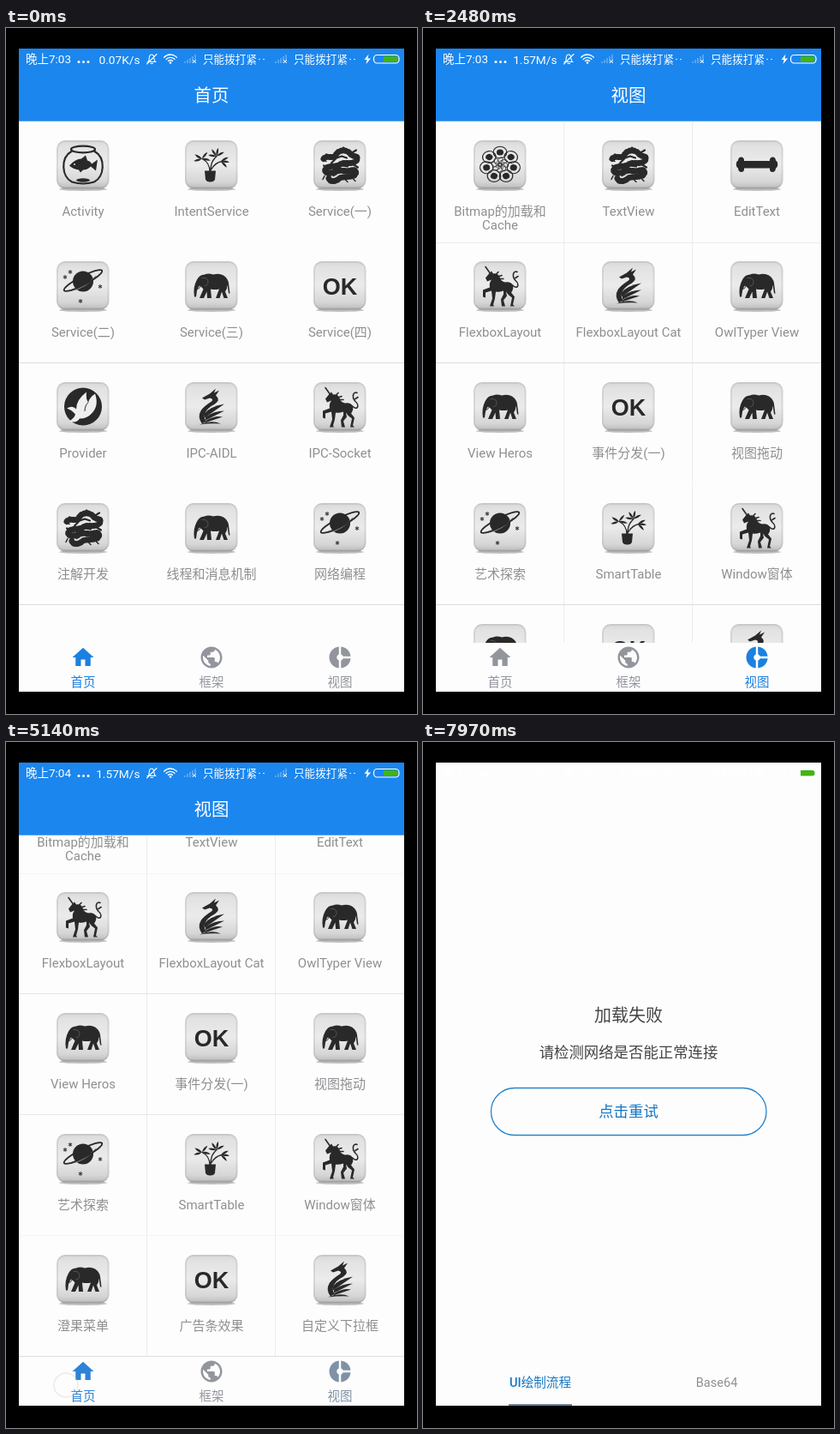
Recreate the animation shown at these times as an HTML page with a canvas. Size 480 by 800 pixels, loop 8000 ms.

```html
<!DOCTYPE html>
<html lang="zh">
<head>
<meta charset="utf-8">
<title>App tabs</title>
<style>
html, body { margin: 0; width: 100%; height: 100%; overflow: hidden; background: #000; }
canvas { display: block; width: 100%; height: 100%; }
</style>
</head>
<body>
<canvas id="stage" width="480" height="800"></canvas>
<script>
const ctx = document.getElementById('stage').getContext('2d');
const LOOP = 8000;
const FONT = 'Roboto, "Noto Sans CJK SC", "Noto Sans CJK", sans-serif';
const PAPER = '#fdfdfd', BLUE = '#1b86ee', INK = '#292929', LABEL = '#8f8f93';
const TOP = 109, BOTTOM = 717, ROW = 141, MAX_SCROLL = 97;
const COLS = [90, 240, 390];

const clamp = (v, a = 0, b = 1) => Math.min(b, Math.max(a, v));
const ramp = (t, a, b) => clamp((t - a) / (b - a));
const lerp = (a, b, p) => a + (b - a) * p;
const easeOut = p => 1 - (1 - p) ** 3;

function mix(a, b, p) {
  return `rgb(${a.map((v, i) => Math.round(lerp(v, b[i], p))).join()})`;
}

function text(s, x, y, size, color, align = 'center', weight = 400) {
  ctx.font = `${weight} ${size}px ${FONT}`;
  ctx.textAlign = align;
  ctx.fillStyle = color;
  ctx.fillText(s, x, y + size * 0.365);
}

function rect(x, y, w, h, color) {
  ctx.fillStyle = color;
  ctx.fillRect(x, y, w, h);
}

function at(x, y, draw, scale = 1) {
  ctx.save();
  ctx.translate(x, y);
  ctx.scale(scale, scale);
  draw();
  ctx.restore();
}

function fill(d, color = INK) {
  ctx.fillStyle = color;
  ctx.fill(new Path2D(d));
}

function line(d, width, color = INK) {
  ctx.strokeStyle = color;
  ctx.lineWidth = width;
  ctx.stroke(new Path2D(d));
}

function oval(x, y, rx, ry, color, width = 0, turn = 0) {
  ctx.beginPath();
  ctx.ellipse(x, y, rx, ry, turn, 0, Math.PI * 2);
  if (width) {
    ctx.strokeStyle = color;
    ctx.lineWidth = width;
    ctx.stroke();
  } else {
    ctx.fillStyle = color;
    ctx.fill();
  }
}

// Pictograms, drawn around the centre of a tile
const icons = {
  fish() {
    line('M-13 -16C-27 -8 -25 14 -13 20Q0 24 13 20C25 14 27 -8 13 -16', 2.2);
    oval(0, -18, 14, 3.8, INK, 2.2);
    oval(0, 18, 8, 2.2, INK);
    fill('M-16 1Q-9 -7 -2 -7L3 -11 5 -5Q9 -4 10 -1L17 -6 15 7 9 2Q5 6 0 6L-3 9 -5 6Q-12 5 -16 1Z');
    oval(-10, -0.5, 1, 1, '#ddd');
  },

  plant() {
    fill('M-8 7H5L4 17Q3 20 -1 20H-2Q-6 20 -7 17Z');
    line('M-2 8C-2 0 -5 -4 -11 -7M-1 8C-1 -3 2 -6 6 -10M0 5C3 0 7 -3 12 -4', 1.3);
    const leaves = [[-11, -7, [2.9, 3.7, 0.2, 5.4]], [6, -10, [3.3, 4.1, 4.9, 5.8]], [11, -4, [0.1, 0.8, 5.8]]];
    for (const [x, y, turns] of leaves)
      for (const turn of turns)
        at(x, y, () => {
          ctx.rotate(turn);
          fill('M0 0Q5 -3 10 0Q5 2 0 0Z');
        });
  },

  coil() {
    const body = 'M-19 -7C-16 -12 -8 -6 -5 -11C-2 -18 8 -18 12 -13C16 -8 21 -12 20 -6C16 1 6 -4 1 -1C-6 4 -14 0 -17 5C-19 11 -10 10 -5 8C2 5 8 9 14 6C20 5 20 12 15 13C8 15 2 13 -2 17C-6 20 -12 20 -13 16';
    line(body, 4.6);
    ctx.setLineDash([1, 3]);
    line(body, 7);
    ctx.setLineDash([]);
    line('M-16 -12L-9 -7M-10 -2L-4 -8L2 -10L8 -8M9 -15L4 -20M14 -14L19 -17M-19 1L-11 5M16 0L21 3M2 1L9 2', 2.2);
    line('M-21 -8L-16 -4M5 16L9 20M14 15L18 19M-18 13L-20 17M-8 13L-4 11', 1.5);
  },

  planet() {
    oval(0, -5, 12, 12, INK);
    const ring = side => {
      ctx.beginPath();
      ctx.ellipse(0, -6, 25, 5, -0.48, side, side + Math.PI);
      ctx.strokeStyle = INK;
      ctx.lineWidth = 1.8;
      ctx.stroke();
    };
    ring(Math.PI);
    at(0, 1, () => line('M-14 5Q2 2 15 -12', 1.2, '#888'));
    ring(0);
    for (const [x, y] of [[-21, -10], [-15, -16], [20, 1], [-3, 18]])
      at(x, y, () => line('M0 -2V2M-1.8 -1L1.8 1M-1.8 1L1.8 -1', 1));
  },

  elephant() {
    fill('M-20 13Q-22 2 -17 -7Q-14 -13 -8 -13Q-4 -15 2 -13Q9 -15 14 -12Q19 -9 20 -3L21.5 9 20 9 18.5 -1Q18.5 4 16 7L19 14.5H14.5L12 7 9.5 14.5H5L9 4Q4 5 -1 4L0 14.5H-5L-5.5 7 -9 14.5H-14L-9.5 4Q-12 1 -14 0Q-16 2 -17 6L-18 13Z');
    line('M-11 -9Q-4 -10 -4 -4Q-5 1 -8 0', 0.7, '#666');
    line('M-13 1Q-14 4 -17 4', 1, INK);
  },

  ok() {
    ctx.font = 'bold 27px "Liberation Sans", Arial, sans-serif';
    ctx.textAlign = 'center';
    ctx.fillStyle = INK;
    ctx.fillText('OK', 0, 10);
  },

  dove() {
    oval(0, 0, 22, 22, INK);
    fill('M-19 2Q-12 -2 -8 3Q-8 -8 4 -17Q3 -9 6 -5Q8 -11 14 -15Q19 -1 10 8Q5 14 -4 14Q-8 20 -16 17Q-10 13 -9 9Q-13 4 -19 2Z', '#efefef');
    line('M6 -5Q2 -1 2 5', 1);
  },

  wyvern() {
    fill('M-11 -10L-2 -15 5 -21 3 -16 9 -19 5 -13Q11 -8 4 -3Q-6 2 -8 9Q-9 14 -6 17L-11 20Q-17 12 -12 4Q-8 -1 0 -6Q3 -9 -2 -10L-8 -8Z');
    fill('M-8 8Q-2 0 15 -3Q5 4 -8 13Z');
    fill('M-7 12Q3 5 15 5Q7 9 -7 16Z');
    fill('M-6 16Q4 10 13 12Q4 15 -8 19Z');
    fill('M-14 21Q0 15 11 20Q0 19 -14 21Z');
  },

  unicorn() {
    fill('M-17 -9L-13 -14 -10 -17 -8 -14Q-2 -15 0 -9Q1 -5 6 -4Q13 -5 15 0Q16 4 13 8L17 13 15 22 17 24H12L14 14Q9 11 7 7L8 12 4 17 6 24H2L1 16 4 10 4 6Q-2 8 -5 7L-6 15 -8 22 -7 24H-12L-9 15 -10 6 -17 8 -17 14 -20 13 -20 5 -12 2Q-13 -3 -10 -7L-15 -5Z');
    line('M-12 -15L-17 -22M-4 -14L-2 -16M-1 -11L2 -12M0 -8L4 -8', 1.6);
    line('M14 -1C21 6 23 -2 18 -6C13 -12 16 -18 20 -16M18 -9L21 -11', 1.6);
  },

  flower() {
    const spin = (n, draw) => {
      for (let i = 0; i < n; i++) {
        ctx.save();
        ctx.rotate(i * Math.PI * 2 / n);
        draw();
        ctx.restore();
      }
    };
    ctx.scale(1.12, 1);
    spin(7, () => {
      oval(0, -14.5, 7, 6.8, INK, 1.1);
      oval(0, -14.5, 3.6, 3.6, INK);
    });
    spin(8, () => oval(0, -5, 2.2, 4.2, INK, 0.7, 0.5));
    oval(0, 0, 1.8, 1.8, INK, 0.8);
  },

  bone() {
    fill('M-15 -4.5H15C14 -10 22 -11 22 -5C25 -4 25 3 22 4C22 10 14 10 15 4H-15C-14 10 -22 10 -22 4C-25 3 -25 -4 -22 -5C-22 -11 -14 -10 -15 -4.5Z');
  }
};

const pages = [
  {
    title: '首页',
    cells: ['fish:Activity', 'plant:IntentService', 'coil:Service(一)',
      'planet:Service(二)', 'elephant:Service(三)', 'ok:Service(四)',
      'dove:Provider', 'wyvern:IPC-AIDL', 'unicorn:IPC-Socket',
      'coil:注解开发', 'elephant:线程和消息机制', 'planet:网络编程']
  },
  {
    title: '框架',
    cells: ['elephant:增量更新', 'flower:RxJava2', 'flower:GreenDao Basic',
      'planet:GreenDao 多对多', 'wyvern:GreenDao Rx', 'planet:EventBus3']
  },
  {
    title: '视图',
    cells: ['flower:Bitmap的加载和|Cache', 'coil:TextView', 'bone:EditText',
      'unicorn:FlexboxLayout', 'wyvern:FlexboxLayout Cat', 'elephant:OwlTyper View',
      'elephant:View Heros', 'ok:事件分发(一)', 'elephant:视图拖动',
      'planet:艺术探索', 'plant:SmartTable', 'unicorn:Window窗体',
      'elephant:澄果菜单', 'ok:广告条效果', 'wyvern:自定义下拉框']
  }
];

const tabIcons = [
  'M10 20v-6h4v6h5v-8h3L12 3 2 12h3v8z',
  'M12 2C6.48 2 2 6.48 2 12s4.48 10 10 10 10-4.48 10-10S17.52 2 12 2zm-1 17.93c-3.95-.49-7-3.85-7-7.93 0-.62.08-1.21.21-1.79L9 15v1c0 1.1.9 2 2 2v1.93zm6.9-2.54c-.26-.81-1-1.39-1.9-1.39h-1v-3c0-.55-.45-1-1-1H8v-2h2c.55 0 1-.45 1-1V7h2c1.1 0 2-.9 2-2v-.41c2.93 1.19 5 4.06 5 7.41 0 2.08-.8 3.97-2.1 5.39z',
  'M11 9.16V2c-5 .5-9 4.79-9 10s4 9.5 9 10v-7.16c-1-.41-2-1.52-2-2.84s1-2.43 2-2.84zM14.86 11H22c-.48-4.75-4-8.53-9-9v7.16c1 .3 1.52.98 1.86 1.84zM13 14.84V22c5-.47 8.52-4.25 9-9h-7.14c-.34.86-.86 1.54-1.86 1.84z'
];

// Page switches: time, from, to
const switches = [[1150, 0, 1], [2060, 1, 2], [5170, 2, 0]];

const DRAG = { from: 2970, to: 3480, x: 306, y: 480, x2: 314, y2: 270 };
const touches = [
  { from: 880, to: 1060, x: 240, y: 752 },
  { from: 1860, to: 1960, x: 380, y: 755 },
  DRAG,
  { from: 4830, to: 5000, x: 70, y: 750 },
  { from: 6560, to: 6720, x: 257, y: 592 }
];

function touchPoint(o, t) {
  const p = ramp(t, o.from, o.to);
  return [lerp(o.x, o.x2 ?? o.x, p), lerp(o.y, o.y2 ?? o.y, p)];
}

function drawTouches(t) {
  for (const o of touches) {
    const alpha = Math.min(ramp(t, o.from - 1, o.from + 60), 1 - ramp(t, o.to, o.to + 190));
    if (alpha <= 0) continue;
    const [x, y] = touchPoint(o, t);
    ctx.globalAlpha = alpha;
    oval(x, y, 14, 14, 'rgba(255,255,255,.55)');
    oval(x, y, 14, 14, '#b9b9b9', 1.6);
    ctx.globalAlpha = 1;
  }
}

function drawTile(x, y, name) {
  at(x, y, () => {
    oval(0, 28.5, 28, 2, 'rgba(0,0,0,.25)');
    const shade = ctx.createLinearGradient(0, -28, 0, 28);
    [[0, '#d8d8d8'], [0.12, '#e2e2e2'], [0.5, '#ebebeb'], [0.85, '#d6d6d6'], [0.95, '#c4c4c4'], [1, '#a0a0a0']]
      .forEach(([p, c]) => shade.addColorStop(p, c));
    ctx.beginPath();
    ctx.roundRect(-31, -28.5, 61.5, 56.5, 10);
    ctx.fillStyle = shade;
    ctx.fill();
    ctx.beginPath();
    ctx.roundRect(-30, -27.5, 59.5, 54.5, 9);
    ctx.strokeStyle = 'rgba(120,120,120,.16)';
    ctx.lineWidth = 2;
    ctx.stroke();
    icons[name]();
  });
}

function drawGrid(page, scroll, fullLines) {
  ctx.save();
  ctx.beginPath();
  ctx.rect(15, TOP, 450, BOTTOM - TOP);
  ctx.clip();
  const rows = page.cells.length / 3, y0 = TOP - scroll;
  if (fullLines) for (const x of [164, 314]) rect(x, y0, 1, rows * ROW - 1, '#ededed');
  // Thin dividers land unevenly on the pixel rows
  const tones = scroll ? ['#f4f4f4', '#e6e6e6', '#e8e8e8', '#f5f5f5', '#dedede']
    : [fullLines ? '#ebebeb' : PAPER, '#dcdcdc', PAPER, '#dcdcdc', '#dcdcdc'];
  for (let r = 0; r < rows; r++) rect(15, y0 + (r + 1) * ROW - (r ? 1 : 0), 450, 1, tones[r]);
  page.cells.forEach((cell, i) => {
    const [icon, label] = cell.split(':');
    const x = COLS[i % 3], y = y0 + Math.floor(i / 3) * ROW;
    drawTile(x, y + 50.5, icon);
    label.split('|').forEach((s, n) => text(s, x, y + 104.5 + n * 16.5, 15, LABEL));
  });
  ctx.restore();
}

function drawTabs(t) {
  const lit = [1, 0, 0];
  for (const [time, a, b] of switches) {
    const p = ramp(t, time - 110, time - 15);
    if (p > 0) {
      lit[a] = 1 - p;
      lit[b] = p;
    }
  }
  COLS.forEach((x, i) => {
    const color = mix([146, 149, 156], [27, 128, 224], lit[i]);
    at(x, 734, () => {
      ctx.translate(-12, -12);
      fill(tabIcons[i], color);
    }, 1.25);
    text(pages[i].title, x, 762.5, 14.5, color);
  });
}

function drawHome(t) {
  const last = switches.filter(s => t >= s[0]).pop();
  const page = pages[last ? last[2] : 0];
  const pull = DRAG.y - 10 - touchPoint(DRAG, t)[1];
  const scroll = page === pages[2] ? clamp(pull, 0, MAX_SCROLL) : 0;
  rect(15, 24, 450, 750, PAPER);
  drawGrid(page, Math.round(scroll), t >= 200);
  rect(15, 24, 450, 84, BLUE);
  rect(15, 108, 450, 1, '#5ea8f2');
  text(page.title, 240, 78.5, 20.5, '#fff');
  drawTabs(t);
}

function drawError() {
  rect(15, 24, 450, 750, PAPER);
  text('加载失败', 240, 319, 20, '#454545');
  text('请检测网络是否能正常连接', 240, 362, 17.4, '#454545');
  ctx.beginPath();
  ctx.roundRect(79.5, 403.5, 321.5, 55, 27.5);
  ctx.strokeStyle = '#2583cb';
  ctx.lineWidth = 1.3;
  ctx.stroke();
  text('点击重试', 240, 431, 17.4, '#1577c4');
  text('UI绘制流程', 137, 746.5, 14.6, '#1577c4', 'center', 500);
  text('Base64', 343, 746.5, 14.6, LABEL);
  rect(100, 772, 74, 2, '#6f8799');
}

function drawSignal(x) {
  for (let i = 0; i < 5; i++) rect(x + i * 3, 39 - i * 2, 2, 2 + i * 2, 'rgba(255,255,255,.25)');
  line(`M${x + 10.5} 37.5l3 3m0 -3l-3 3`, 1, '#fff');
}

function drawStatus(t) {
  const white = '#fff';
  text(t < 3790 ? '晚上7:03' : '晚上7:04', 23, 36.5, 13.5, white, 'left');
  for (const x of [85, 90.5, 96]) oval(x, 39.5, 1.5, 1.5, white);
  const speed = t < 1150 ? '0.07K/s' : t < 5300 ? '1.57M/s' : '370K/s';
  text(speed, 156.5, 36.5, 13.7, white, 'right');
  line('M165 39.5H175M166.5 39C168 36 166 31 170 31C174 31 172 36 174 39M169 41.5H171.5M164.5 42L176 30.5', 1.1, white);
  for (const r of [3.5, 6.7, 10]) {
    ctx.beginPath();
    ctx.arc(192, 41, r, -2.4, -0.74);
    ctx.strokeStyle = white;
    ctx.lineWidth = 1.3;
    ctx.stroke();
  }
  oval(192, 40.5, 1.3, 1.3, white);
  for (const x of [208, 314]) {
    drawSignal(x);
    text('只能拨打紧', x + 22, 36.5, 12.6, white, 'left');
    for (const dx of [88, 93]) oval(x + dx, 36.5, 0.8, 0.8, white);
  }
  fill('M423.5 30.5L418.5 37H421.5L420.5 42L426 35.5H422.5Z', white);
  ctx.beginPath();
  ctx.roundRect(429.5, 31.5, 29.5, 9.5, 4);
  ctx.strokeStyle = white;
  ctx.lineWidth = 1.2;
  ctx.stroke();
  ctx.beginPath();
  ctx.roundRect(441, 33, 16.5, 6.5, [0, 3, 3, 0]);
  ctx.fillStyle = '#43b414';
  ctx.fill();
}

function draw(t) {
  rect(0, 0, 480, 800, '#000');
  ctx.save();
  ctx.beginPath();
  ctx.rect(15, 24, 450, 750);
  ctx.clip();
  const slide = easeOut(ramp(t, 7740, 7965));
  if (slide < 1) at(-112 * slide, 0, () => drawHome(t));
  if (slide > 0) at(450 * (1 - slide), 0, drawError);
  drawStatus(t);
  drawTouches(t);
  ctx.restore();
}

ctx.lineCap = 'round';
ctx.lineJoin = 'round';
const start = performance.now();
function tick() {
  draw((performance.now() - start) % LOOP);
  requestAnimationFrame(tick);
}
tick();
</script>
</body>
</html>
```
